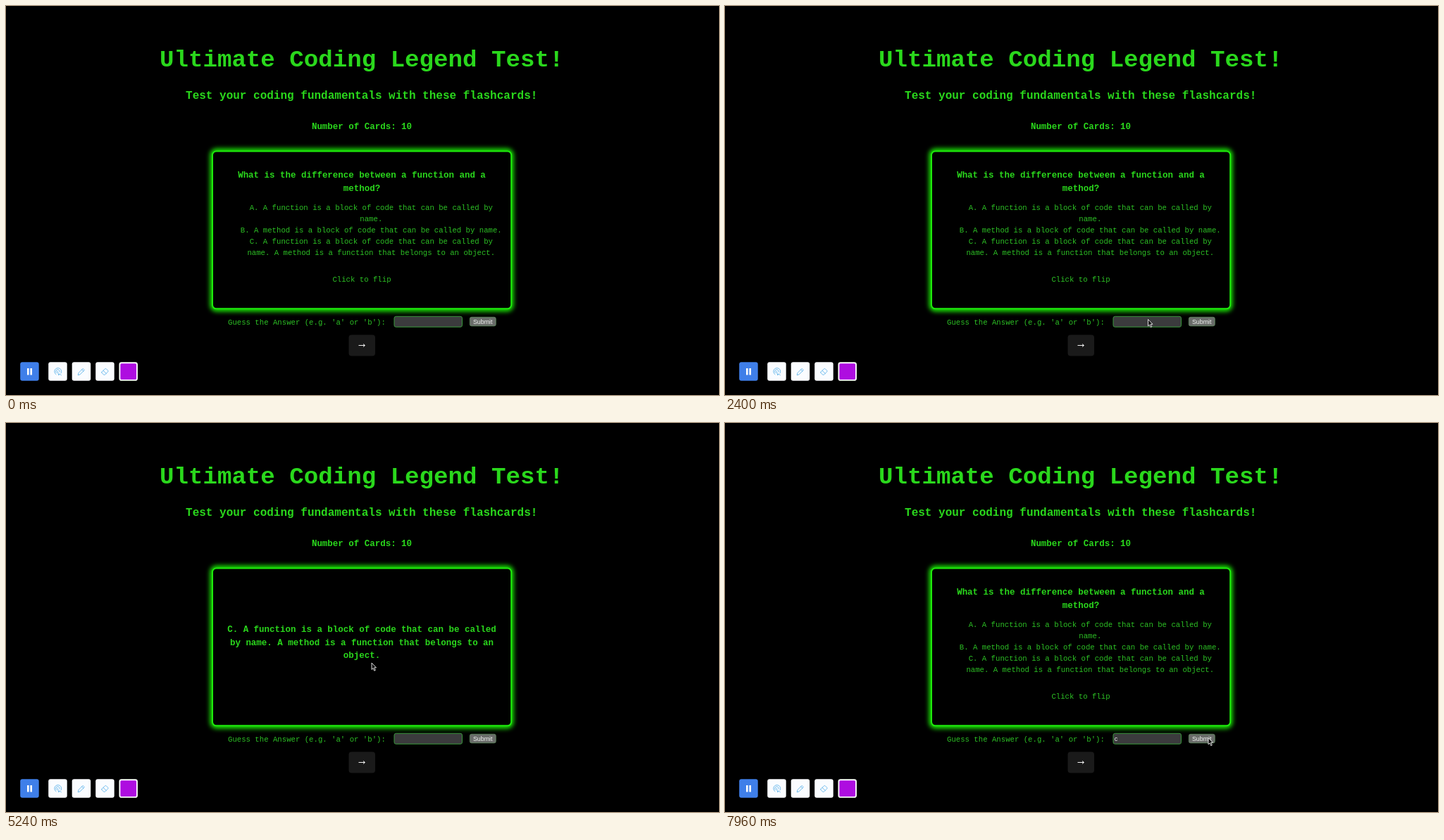
Recreate the animation shown at these times as an HTML page. Size 1012 by 553 pixels, loop 8 s.

```html
<!DOCTYPE html>
<html lang="en">
<head>
<meta charset="utf-8">
<title>Flashcards</title>
<style>
  html, body { margin: 0; width: 100%; height: 100%; overflow: hidden; background: #000; }
  svg { display: block; }
  text { font: 10.667px "Courier New", "Liberation Mono", monospace; fill: #2cc024; white-space: pre; }
  .mid { text-anchor: middle; }
  .bold { font-weight: bold; fill: #2ad81c; }
  .h1 { font-size: 34.133px; }
  .h2 { font-size: 16px; }
  .h3 { font-size: 12.48px; }
  .ui { font: 8.889px "Liberation Sans", sans-serif; fill: #f2f2f2; }
  .glow { fill: #18e404; filter: blur(3.3px); }
  .icon { fill: none; stroke: #62b5ea; stroke-width: .9; stroke-linejoin: round; stroke-linecap: round; }
</style>
</head>
<body>
<svg width="1012" height="553" viewBox="0 0 1012 553">
  <text class="mid bold h1" x="504.7" y="86">Ultimate Coding Legend Test!</text>
  <text class="mid bold h2" x="504.7" y="131.5">Test your coding fundamentals with these flashcards!</text>
  <text class="mid bold h3" x="505" y="175.3">Number of Cards: 10</text>

  <rect class="glow" x="289.5" y="202.5" width="431" height="232" rx="9"/>
  <rect x="293" y="206.5" width="424.2" height="223.8" rx="5.5" stroke="#1eea0c" stroke-width="2"/>
  <g id="front"></g>
  <g id="back"></g>

  <text x="315" y="452.5">Guess the Answer (e.g. 'a' or 'b'):</text>
  <rect x="551" y="441.3" width="96.5" height="15" rx="2.5" fill="#3b3b3d" stroke="#38983a"/>
  <text id="guess" class="ui" x="552.8" y="452"></text>
  <rect x="658.3" y="442.3" width="37" height="12.6" rx="2.5" fill="#6a6d6a" stroke="#5c8a5c" stroke-width=".8"/>
  <text class="ui mid" x="676.7" y="451.7">Submit</text>
  <rect x="486.5" y="467.5" width="37.5" height="30" rx="4" fill="#1a1a1a"/>
  <path d="M500.5 482.5H509M507 480.5L509.5 482.5L507 484.5" fill="none" stroke="#f4f4f4"/>

  <rect x="20.2" y="506.3" width="26.5" height="26.5" rx="3" fill="#3f7fe9"/>
  <path d="M30 515h2.6v9.5H30zM34.4 515H37v9.5h-2.6z" fill="#fff"/>
  <g id="tools"></g>
  <rect x="161.4" y="507.3" width="24.6" height="24.6" rx="2.5" fill="#ae0de0" stroke="#fff" stroke-width="1.9"/>
  <g class="icon">
    <path d="M71 523.8A5 5 0 1 1 78.3 521.8M71.6 521.6A2.8 2.8 0 1 1 76.3 520.2M73.2 519.3L74.8 525L76 522.8L78.4 524.8"/>
    <path d="M102.3 524.4l.8-3 6-6 2.2 2.2-6 6zM107.6 516.9l2.2 2.2"/>
    <path d="M135.7 520.7l5-5q.7-.5 1.4 0l2.7 2.7q.5.7 0 1.4l-4.4 4.4h-1.6l-3.1-2.9q-.4-.3 0-.6zM138 518.3l4.3 4.2"/>
  </g>

  <path id="cursor" d="M.5 .5V10L2.6 8L4.2 11.7L5.8 11L4.2 7.3H7Z" fill="#111" stroke="#eee" stroke-width=".9"/>
</svg>
<script>
const LOOP = 8000;
const el = id => document.getElementById(id);
const line = (s, x, y, cls = "") => `<text class="mid ${cls}" x="${x}" y="${y}">${s}</text>`;

el("front").innerHTML =
  ["What is the difference between a function and a", "method?"]
    .map((s, i) => line(s, 505, 244 + i * 18.7, "bold h3")).join("") +
  ["A. A function is a block of code that can be called by", "name.",
   "B. A method is a block of code that can be called by name.",
   "C. A function is a block of code that can be called by",
   "name. A method is a function that belongs to an object."]
    .map((s, i) => line(s, 518.3, 290 + i * 16)).join("") +
  line("Click to flip", 505, 391.5);

el("back").innerHTML =
  ["C. A function is a block of code that can be called",
   "by name. A method is a function that belongs to an", "object."]
    .map((s, i) => line(s, 505, 297 + i * 18.7, "bold h3")).join("");

el("tools").innerHTML = [60.2, 93.7, 127.2]
  .map(x => `<rect x="${x}" y="506.3" width="26.5" height="26.5" rx="3" fill="#fafcff"/>`).join("");

// Pointer stops: time, x, y
const stops = [
  [900, 740, 350], [1360, 685, 390], [1900, 600, 445], [2900, 600, 445],
  [3400, 677.5, 447], [3900, 677.5, 447], [4650, 518.5, 340.5], [6100, 518.5, 340.5],
  [6640, 591, 432.5], [6840, 596, 444], [7350, 596, 444], [7800, 685.5, 447], [LOOP, 685.5, 447]
];

function pointer(t) {
  const i = stops.findIndex(s => s[0] > t);
  const [t0, x0, y0] = stops[i - 1], [t1, x1, y1] = stops[i];
  const p = (t - t0) / (t1 - t0), e = p * p * (3 - 2 * p);
  return [x0 + (x1 - x0) * e, y0 + (y1 - y0) * e];
}

const show = (id, on) => el(id).style.display = on ? "" : "none";

function draw(now) {
  const t = now % LOOP;
  const flipped = t >= 5080 && t < 6960;
  show("front", !flipped);
  show("back", flipped);
  el("guess").textContent = t >= 2500 && t < 3720 ? "a" : t >= 7200 ? "c" : "";
  const visible = t >= stops[0][0];
  show("cursor", visible);
  if (visible) el("cursor").setAttribute("transform", `translate(${pointer(t)})`);
  requestAnimationFrame(draw);
}
requestAnimationFrame(draw);
</script>
</body>
</html>
```
